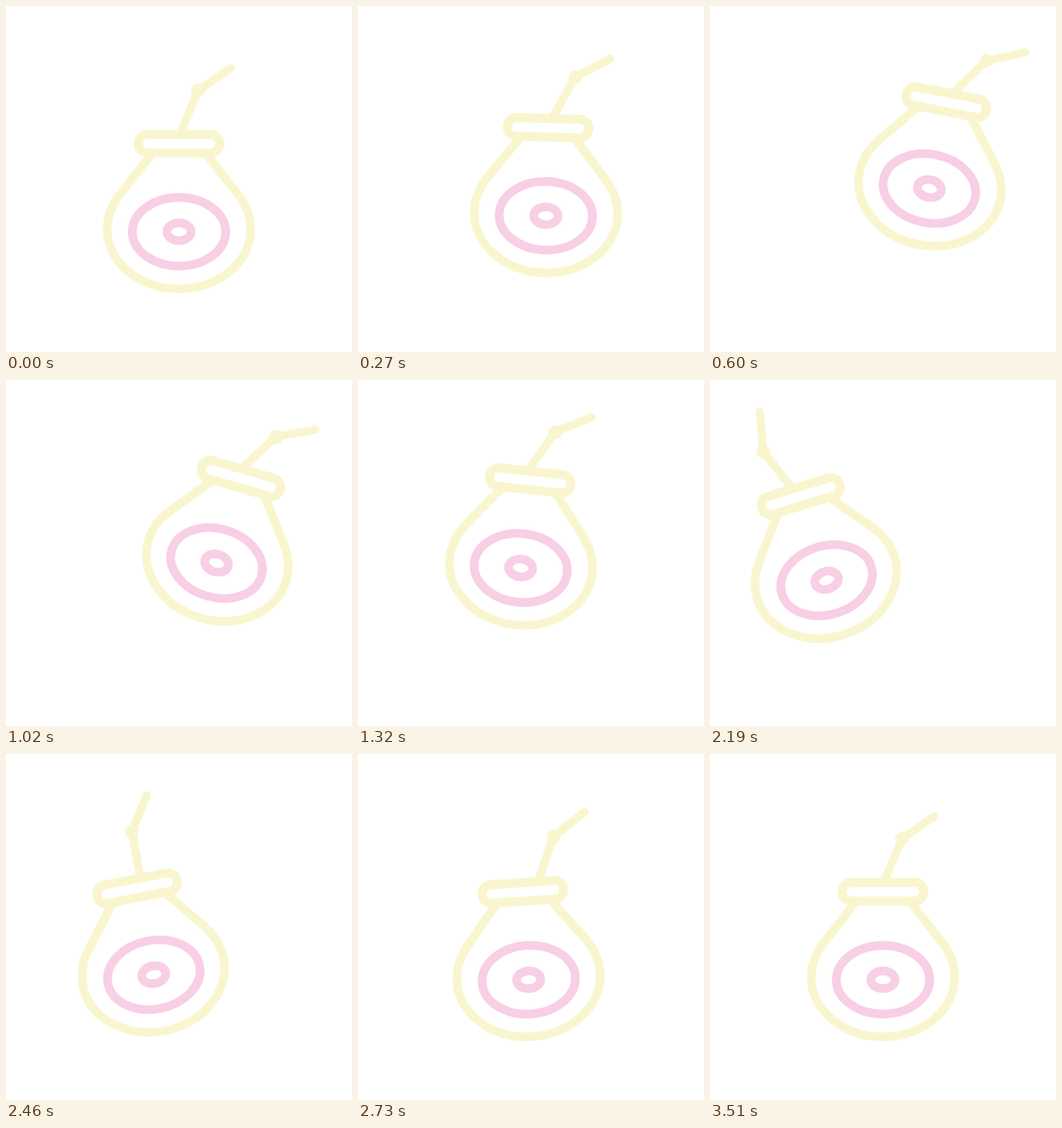
An HTML page with a canvas for the animation above (5.63 s loop, 400 by 400 pixels).

```html
<!DOCTYPE html>
<html lang="en">
<head>
<meta charset="utf-8">
<title>Swinging gourd</title>
<style>
  html, body { margin: 0; width: 100%; height: 100%; overflow: hidden; background: #fff; }
  canvas { display: block; width: 100vw; height: 100vh; }
</style>
</head>
<body>
<canvas id="stage" width="400" height="400"></canvas>
<script>
const ctx = document.getElementById('stage').getContext('2d');
const LOOP = 5630, STEP = 30, REST = 3510;
const CREAM = '#f9f6cf', PINK = '#f8cfe5';
const PIVOT_Y = 261, RAD = Math.PI / 180;

// Straw keys: [time, slide along the rim, tilt in degrees]
const STRAW = [
  [0, 0, 0], [300, 4, 6], [600, 5, 12], [850, -2, 8],
  [1320, -4.5, 6.3], [1710, -19, -29.5], [1950, -18, -49], [2190, -10.5, -43.5],
  [2730, 17.5, 0], [2930, 20, 7.5], [3300, 4, 1.5], [REST, 0, 0]
];

// Eased progress between two times
function ease(t, from, to) {
  const u = Math.min(1, Math.max(0, (t - from) / (to - from)));
  return u * u * (3 - 2 * u);
}

const mix = (a, b, f) => a + (b - a) * f;

// Smooth curve through keyed values
function spline(keys, col, t) {
  const last = keys.length - 1;
  if (t >= keys[last][0]) return keys[last][col];
  let i = 0;
  while (t >= keys[i + 1][0]) i++;
  const slope = k => k === 0 || k === last ? 0 :
    (keys[k + 1][col] - keys[k - 1][col]) / (keys[k + 1][0] - keys[k - 1][0]);
  const span = keys[i + 1][0] - keys[i][0];
  const u = (t - keys[i][0]) / span, v = 1 - u;
  return v * v * (1 + 2 * u) * keys[i][col] + u * u * (3 - 2 * u) * keys[i + 1][col]
    + span * u * v * (v * slope(i) - u * slope(i + 1));
}

function position(t) {
  if (t < 780) {
    const f = ease(t, 0, 780);
    return [62 * f, -54 * (1 - Math.pow(1 - f, 1.3))];
  }
  if (t < 1870) {
    const f = ease(t, 780, 1870);
    return [mix(62, -88, f), -43.7 - 10 * (2 * f - 1) ** 2];
  }
  const f = ease(t, 1870, 2830);
  return [-88 * (1 - f), -53.7 * (1 - f) ** 2];
}

function tilt(t) {
  if (t < 910) return 17 * ease(t, 130, 910);
  if (t < 2030) return mix(17, -18.3, ease(t, 910, 2030));
  return -18.3 * (1 - ease(t, 2030, 3020));
}

function stroke(color, width, build) {
  ctx.strokeStyle = color;
  ctx.lineWidth = width;
  ctx.beginPath();
  build();
  ctx.stroke();
}

function ring(rx, ry) {
  stroke(PINK, 10, () => ctx.ellipse(200, PIVOT_Y, rx, ry, 0, 0, 2 * Math.PI));
}

function drawStraw(t) {
  ctx.save();
  ctx.translate(202 + spline(STRAW, 1, t), 145);
  ctx.rotate(spline(STRAW, 2, t) * RAD);
  stroke(CREAM, 9.5, () => {
    ctx.moveTo(-0.5, 2);
    ctx.lineTo(20, -47);
    ctx.lineTo(57.5, -73);
  });
  ctx.fillStyle = CREAM;
  ctx.beginPath();
  ctx.arc(20, -47, 8, 0, 2 * Math.PI);
  ctx.fill();
  ctx.restore();
}

function drawGourd() {
  stroke(CREAM, 10, () => {
    ctx.moveTo(167, 173);
    ctx.lineTo(130, 220);
    ctx.bezierCurveTo(122, 231, 117, 244, 117, 258);
    ctx.bezierCurveTo(117, 296, 154, 327, 200, 327);
    ctx.bezierCurveTo(246, 327, 283, 296, 283, 258);
    ctx.bezierCurveTo(283, 244, 278, 231, 270, 220);
    ctx.lineTo(233, 173);
  });
  stroke(CREAM, 10.5, () => ctx.roundRect(153, 148.5, 94, 21.5, 10));
  ring(54, 39.7);
  ring(14, 10.3);
}

function draw(t) {
  const [x, y] = position(t);
  ctx.fillStyle = '#fff';
  ctx.fillRect(0, 0, 400, 400);
  ctx.save();
  ctx.translate(200 + x, PIVOT_Y + y);
  ctx.rotate(tilt(t) * RAD);
  ctx.translate(-200, -PIVOT_Y);
  drawStraw(t);
  drawGourd();
  ctx.restore();
}

ctx.lineCap = ctx.lineJoin = 'round';
const start = performance.now();

function tick() {
  const t = (performance.now() - start) % LOOP;
  draw(Math.min(REST, Math.floor(t / STEP) * STEP));
  requestAnimationFrame(tick);
}
tick();
</script>
</body>
</html>
```
